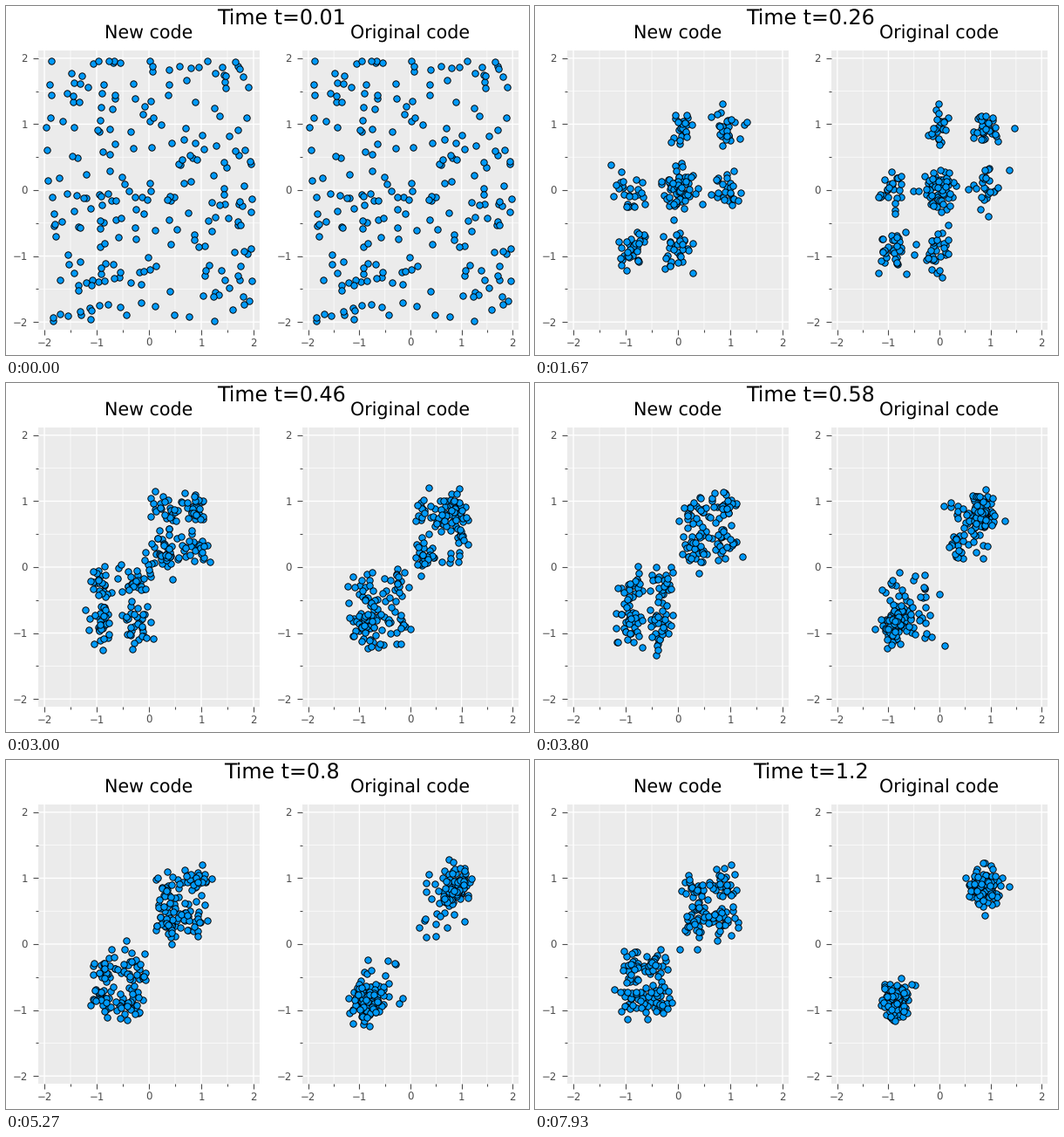
A matplotlib script for the animation above (8 s loop, 600 by 400 pixels).

```python
import numpy as np
import matplotlib.pyplot as plt
from matplotlib.animation import FuncAnimation

W, H, DPI = 600, 400, 100
FRAMES, INTERVAL = 120, 66.63
DT, PULL, NOISE = 0.01, 10.0, 0.6
PX = 72 / DPI  # points per pixel
GREY = "#4d4d4d"

plt.rcParams.update({"font.family": "DejaVu Sans", "text.hinting": "none"})
rng = np.random.default_rng(12)

# Agents per half-unit cell of the square [-2, 2]^2, top row first
CELLS = [
    [2, 6, 6, 1, 5, 4, 7, 5],
    [4, 3, 6, 3, 4, 1, 2, 1],
    [2, 2, 6, 2, 3, 4, 3, 5],
    [2, 2, 2, 1, 1, 7, 4, 3],
    [4, 5, 10, 6, 6, 1, 6, 7],
    [4, 2, 4, 2, 2, 4, 2, 6],
    [2, 6, 9, 5, 2, 0, 5, 5],
    [4, 6, 3, 2, 3, 1, 5, 4],
]


def scatter_start():
    pts = []
    for r, row in enumerate(CELLS):
        for c, count in enumerate(row):
            corner = np.array([-2 + c / 2, 1.5 - r / 2])
            pts.append(corner + rng.uniform(0.01, 0.49, (count, 2)))
    return rng.permutation(np.concatenate(pts))


start = scatter_start()
n = len(start)
medium = rng.permutation(np.where(np.arange(n) % 2, 1, -1))[:, None]
side = np.sign(start)


def simulate(switch_time):
    """Agents drift to a mix of their medium and their influencer."""
    x = start.copy()
    path = [x.copy()]
    for k in range(1, FRAMES):
        t = k * DT
        drift = 1 - np.exp(-(t / 0.3) ** 2)
        near, far = 0.92 - 0.05 * drift, 0.37 * drift
        agrees = (side == medium) | (t > switch_time)
        target = medium * np.where(agrees, near, far)
        x = x + PULL * (target - x) * DT
        x += NOISE * np.sqrt(DT) * rng.standard_normal((n, 2))
        path.append(x.copy())
    return path


never = np.full((n, 1), np.inf)
switching = 0.2 + rng.gamma(2, 0.13, (n, 1))
paths = [simulate(never), simulate(switching)]

fig = plt.figure(figsize=(W / DPI, H / DPI), dpi=DPI, facecolor="white")


def label(x, baseline, text, size):
    return fig.text(x / W, 1 - baseline / H, text, fontsize=size * PX,
                    ha="center", va="baseline", color="black")


def panel(left, right, title):
    top, bottom = 51, 371
    ax = fig.add_axes([left / W, 1 - bottom / H,
                       (right - left) / W, (bottom - top) / H])
    ax.set(facecolor="#ebebeb", xlim=(-2.117, 2.117), ylim=(-2.117, 2.117))
    ax.set_axisbelow(True)
    ax.grid(which="major", color="white", lw=1.0)
    ax.grid(which="minor", color="white", lw=0.5)
    for axis in (ax.xaxis, ax.yaxis):
        axis.set_ticks(range(-2, 3))
        axis.set_ticks(np.arange(-1.5, 2, 1), minor=True)
        for tick in axis.get_major_ticks() + axis.get_minor_ticks():
            tick.gridline.set_snap(False)
    ax.tick_params(which="major", length=6 * PX, width=0.8, color=GREY,
                   labelcolor=GREY, labelsize=11.8 * PX)
    ax.tick_params(which="minor", length=3 * PX, width=0.8, color=GREY)
    ax.tick_params(axis="x", pad=4 * PX)
    ax.tick_params(axis="y", pad=6 * PX)
    for spine in ax.spines.values():
        spine.set_visible(False)
    label((left + right) / 2, 38, title, 20.7)
    return ax.scatter(start[:, 0], start[:, 1], s=(7.4 * PX) ** 2,
                      c="#009afa", edgecolors="black", linewidths=0.68,
                      zorder=3)


dots = [panel(37, 291, "New code"), panel(340, 588, "Original code")]
clock = label(316, 20.8, "", 23.7)


def draw(k):
    clock.set_text(f"Time t={round((k + 1) * DT, 2)}")
    for dot, path in zip(dots, paths):
        dot.set_offsets(path[k])
    return [clock, *dots]


anim = FuncAnimation(fig, draw, frames=FRAMES, interval=INTERVAL,
                     repeat=True, repeat_delay=0)
plt.show()
```
